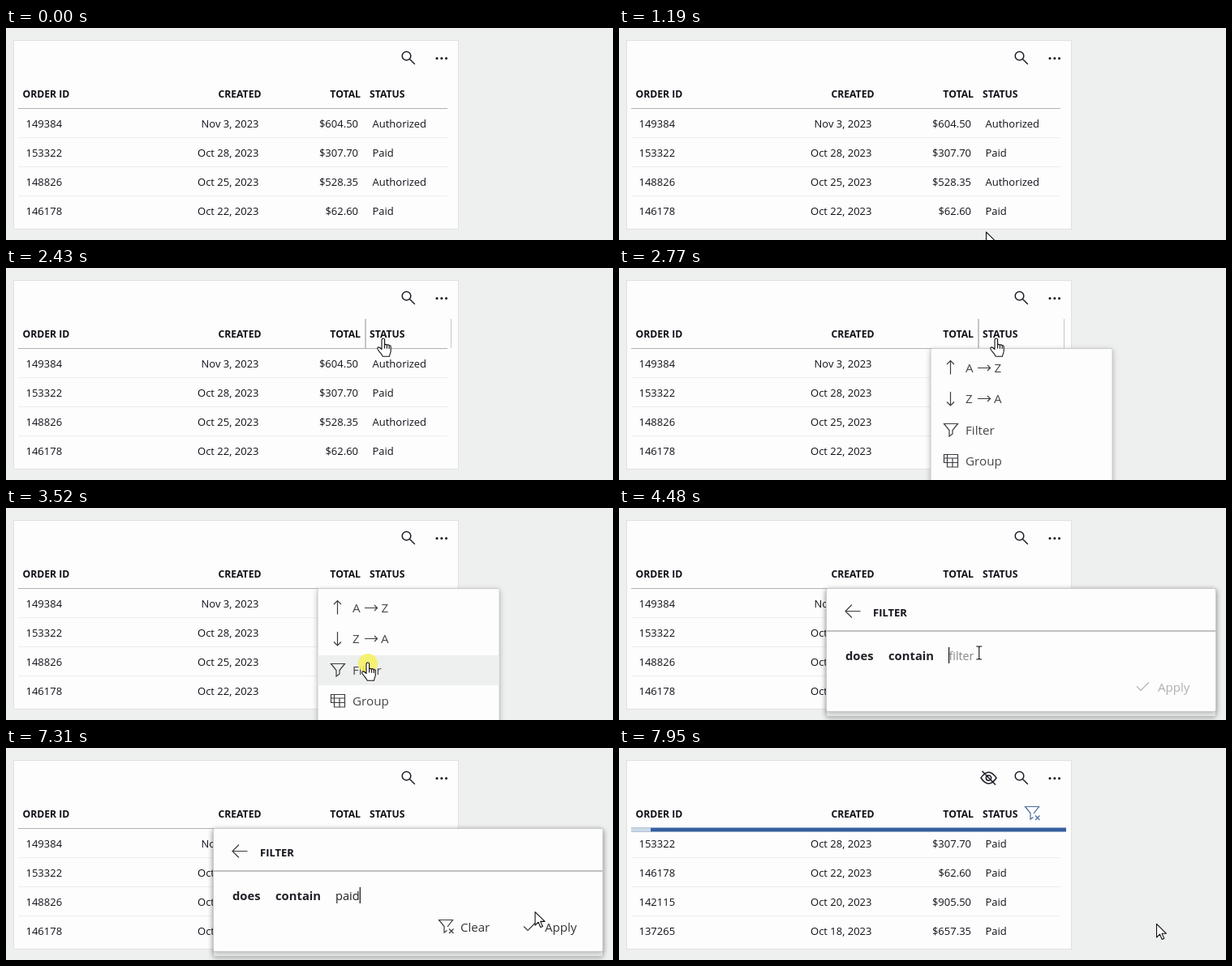
Animation, 748 px wide and 262 px high, one loop 8 s. Source, as an HTML page:

```html
<!DOCTYPE html>
<html lang="en">
<head>
<meta charset="utf-8">
<title>Filtering a table column</title>
<style>
  html, body { margin: 0; width: 100%; height: 100%; overflow: hidden; background: #eef0f0; }
  svg { display: block; width: 748px; height: 262px; font: 13px "Open Sans", "Noto Sans", sans-serif; fill: #12111a; }
  .head { font-size: 12.2px; font-weight: 700; }
  .end { text-anchor: end; }
  .line { fill: none; stroke: #1d1c26; stroke-width: 1.5; }
  .thin { fill: none; stroke: #3c3c42; stroke-width: 1.2; }
  .big { font-size: 15.2px; fill: #47474c; }
  #panel .big { font-size: 15px; fill: #333338; }
  .bold { font-size: 14.8px; font-weight: 700; fill: #222128; }
  .input { font-size: 14.6px; fill: #1f1f24; }
  .sheet { fill: #fdfdfd; stroke: #c9c9cb; filter: drop-shadow(0 2px 3px rgba(0, 0, 0, .25)); }
  .pointer path { fill: #fff; stroke: #111; stroke-width: 1.1; stroke-linejoin: round; }
</style>
</head>
<body>
<svg viewBox="0 0 748 262">
  <defs>
    <path id="funnel" d="M.5 .5h17l-6.5 8v4.5l-4 3v-7.5z"/>
    <path id="funnelOff" d="M11 9l6.5-8.5h-17l6.5 8v7.5l3.5-2.5M13 11.5l5.5 5.5M18.5 11.5l-5.5 5.5"/>
  </defs>

  <rect x="9.5" y="15.5" width="548" height="233" fill="#fdfdfd" stroke="#e0e2e2"/>
  <g class="line">
    <circle cx="493.5" cy="34.5" r="5.3"/>
    <path d="M497.5 38.500l6.3 6.3"/>
    <path id="eye" d="M446 37q9.5-14 19 0q-9.5 14-19 0zM452.3 37a3.2 3.2 0 1 0 6.4 0a3.2 3.2 0 1 0-6.4 0M447.5 28.5l16.5 17"/>
  </g>
  <circle cx="531" cy="37.5" r="1.5"/><circle cx="536.8" cy="37.5" r="1.5"/><circle cx="542.5" cy="37.5" r="1.5"/>

  <g class="head">
    <text x="20.5" y="86">ORDER ID</text>
    <text x="314.5" y="86" class="end">CREATED</text>
    <text x="437" y="86" class="end">TOTAL</text>
    <text x="448" y="86">STATUS</text>
  </g>
  <g id="separators" fill="#c6c6c8">
    <rect x="442" y="63" width="2" height="36"/><rect x="548" y="63" width="1" height="36"/>
  </g>
  <g fill="#eeeeef">
    <rect x="15" y="135" width="529" height="1"/><rect x="15" y="171" width="529" height="1"/><rect x="15" y="207" width="529" height="1"/>
  </g>
  <rect id="hover" x="15" width="529" height="37" fill="#eee"/>
  <rect x="15" y="99" width="529" height="1" fill="#b4b1b5"/>
  <g id="allRows"></g>
  <g id="paidRows"></g>
  <g id="scrollbars" fill="#161621">
    <rect x="544" y="98" width="7" height="65" rx="3.5"/><rect x="15" y="235" width="526" height="7" rx="3.5"/>
  </g>
  <g id="loading">
    <use href="#funnelOff" x="500" y="72" class="thin" style="stroke:#4b6b9c"/>
    <rect x="15" y="98.5" width="536" height="5" fill="#365f9f"/>
    <rect id="gap" x="15" y="98.5" height="5" fill="#ccd8e6"/>
  </g>

  <g id="menu">
    <rect class="sheet" x="384" y="99.5" width="224" height="180" rx="2"/>
    <rect id="itemHover" x="384.5" width="223" height="37" fill="#eeefef"/>
    <g class="thin">
      <path d="M408.5 131.5v-17M404 119l4.5-4.5l4.5 4.5M408.5 153v17M404 165.5l4.5 4.5l4.5-4.5"/>
      <path d="M442 123.5h15.5M454 120l3.5 3.5l-3.5 3.5M442 161.5h15.5M454 158l3.5 3.5l-3.5 3.5"/>
      <use href="#funnel" x="400" y="192"/>
      <path d="M400.5 230.5h17v4.5h-17zM404.5 230.5v15.5h13v-11M404.5 240.5h13M411 235v11M400.5 235v5.5h4"/>
    </g>
    <g class="big">
      <text x="427" y="129">A</text><text x="462.5" y="129">Z</text>
      <text x="427" y="167">Z</text><text x="462" y="167">A</text>
      <text x="427" y="206">Filter</text>
      <text x="427" y="244">Group</text>
    </g>
  </g>

  <g id="panel">
    <rect class="sheet" x="255.5" y="99.5" width="480" height="158" rx="2" style="fill:#f1f2f2"/>
    <rect class="sheet" x="255.5" y="99.5" width="480" height="152" rx="2"/>
    <rect x="256" y="151" width="479" height="2" fill="#c2c2c5"/>
    <path class="thin" d="M297.5 127.5h-18M287 119.5l-8 8l8 8"/>
    <text x="313" y="133.5" style="font-weight:700">FILTER</text>
    <text class="bold" x="279" y="187.5">does</text>
    <text class="bold" x="332" y="187.5">contain</text>
    <text class="input" id="placeholder" x="406.5" y="187.5" style="fill:#858588;font-size:14.2px">filter</text>
    <text class="input" id="typed" x="406" y="187.5"></text>
    <rect id="caret" y="172" width="1.2" height="20" fill="#111"/>
    <g id="clear">
      <use href="#funnelOff" x="533" y="212" class="thin"/>
      <text class="big" x="560" y="227">Clear</text>
    </g>
    <rect id="applyHover" x="620" y="203" width="102" height="38" fill="#eeefef"/>
    <g id="apply">
      <path class="thin" d="M638 220.5l5 5l10-10"/>
      <text class="big" x="664" y="227">Apply</text>
    </g>
  </g>

  <g id="pointer" class="pointer">
    <circle id="spot" r="12" cy="1" fill="#f6f15c" opacity=".85"/>
    <path id="arrow" d="M.5 .5v16.5l4-3.8l2.7 6.3l2.6-1.1l-2.7-6.1h5.4z"/>
    <path id="hand" d="M-2 13.5V1.8a1.8 1.8 0 0 1 3.6 0V8.5c.2-1.5 2.6-1.5 2.8 .2c.3-1.3 2.5-1.2 2.7 .6c.4-1.1 2.1-.7 2.1 1V15.5c0 2.5-1.5 4-1.7 6.8H-.8c-.4-2-3.6-5-6-8.6c-1.4-2.2 .8-3.6 2.5-2.2zM1.6 8v4.5M4.4 8.7v4M7.1 9.5v3.5"/>
    <path id="beam" style="fill:none" d="M-3.5-8h2.5l1 1l1-1h2.5M-3.5 8h2.5l1-1l1 1h2.5M0-7v14"/>
  </g>
</svg>
<script>
const LOOP = 8000, MENU = 2700, PANEL = 3590, TYPING = 5570, CLOSED = 7880, FILTERED = 7950;
const el = id => document.getElementById(id);
const show = (id, on) => el(id).style.display = on ? '' : 'none';
const within = (t, spans) => spans.some(([from, to]) => t >= from && t < to);

const orders = [
  ['149384', 'Nov 3, 2023', '$604.50', 'Authorized'],
  ['153322', 'Oct 28, 2023', '$307.70', 'Paid'],
  ['148826', 'Oct 25, 2023', '$528.35', 'Authorized'],
  ['146178', 'Oct 22, 2023', '$62.60', 'Paid'],
  ['142115', 'Oct 20, 2023', '$905.50', 'Paid'],
  ['137265', 'Oct 18, 2023', '$657.35', 'Paid']
];
const columns = [[24.5, ''], [311.5, 'end'], [434, 'end'], [451.5, '']];
const renderRows = rows => rows.slice(0, 4).map((row, i) => row.map((value, c) =>
  `<text x="${columns[c][0]}" y="${123 + 36 * i}" class="${columns[c][1]}">${value}</text>`).join('')).join('');
el('allRows').innerHTML = renderRows(orders);
el('paidRows').innerHTML = renderRows(orders.filter(row => row[3] === 'Paid'));

// Pointer path: time, x, y
const path = [
  [1190, 452, 252], [1540, 457, 147.5], [1960, 460, 112], [2020, 461, 106], [2430, 465, 87],
  [2800, 465, 87], [3380, 446, 191], [3990, 446, 191], [4480, 443.5, 179], [4760, 518, 178],
  [4830, 519, 181], [4970, 521, 191], [7030, 521, 191], [7310, 651.5, 202], [7520, 662, 217], [8000, 662, 217]
];
const clicks = [[2530, 2770], [3400, 3590], [7600, 7840]];
const caretOff = [[3990, 4440], [4970, 5500], [6760, 7290], [7820, 7880]];
const keys = [[TYPING, 'p'], [5770, 'a'], [6030, 'i'], [6230, 'd']];

function pointerAt(t) {
  const i = Math.max(1, path.findIndex(p => p[0] > t));
  const [a, b] = [path[i - 1], path[i]];
  const k = Math.max(0, (t - a[0]) / (b[0] - a[0]));
  return [a[1] + (b[1] - a[1]) * k, a[2] + (b[2] - a[2]) * k];
}

function draw(t) {
  const [x, y] = pointerAt(t);
  const visible = within(t, [[1190, TYPING], [7030, LOOP]]);
  const menu = t >= MENU && t < PANEL, panel = t >= PANEL && t < CLOSED;
  const overBody = visible && t < MENU && y >= 99 && y < 248;
  const overApply = panel && visible && x > 620 && y > 203;

  show('separators', visible && y < 99);
  show('scrollbars', overBody);
  show('hover', overBody);
  el('hover').setAttribute('y', 99 + 36 * Math.min(3, Math.floor((y - 99) / 36)));
  show('allRows', t < FILTERED);
  show('paidRows', t >= FILTERED);
  show('eye', t >= CLOSED);
  show('loading', t >= CLOSED);
  el('gap').setAttribute('width', t < FILTERED ? 0 : 24);

  show('menu', menu);
  show('itemHover', y > 104);
  el('itemHover').setAttribute('y', 105 + 38.5 * Math.floor((y - 104) / 38.5));

  show('panel', panel);
  const text = keys.filter(k => t >= k[0]).map(k => k[1]).join('');
  el('typed').textContent = text;
  show('placeholder', !text);
  show('clear', text);
  el('apply').style.opacity = text ? 1 : .38;
  show('applyHover', overApply);
  show('caret', !within(t, caretOff));
  if (panel) el('caret').setAttribute('x', 406 + (text ? el('typed').getComputedTextLength() : 0));

  const outside = t >= CLOSED || (t < MENU && y > 246);
  const beam = panel && x < 600 && y < 200;
  const hand = !outside && (!panel || overApply);
  show('pointer', visible);
  show('spot', within(t, clicks));
  show('beam', beam);
  show('hand', hand);
  show('arrow', !beam && !hand);
  el('pointer').setAttribute('transform', `translate(${x} ${y})`);
}

function tick() {
  draw(performance.now() % LOOP);
  requestAnimationFrame(tick);
}
tick();
</script>
</body>
</html>
```
